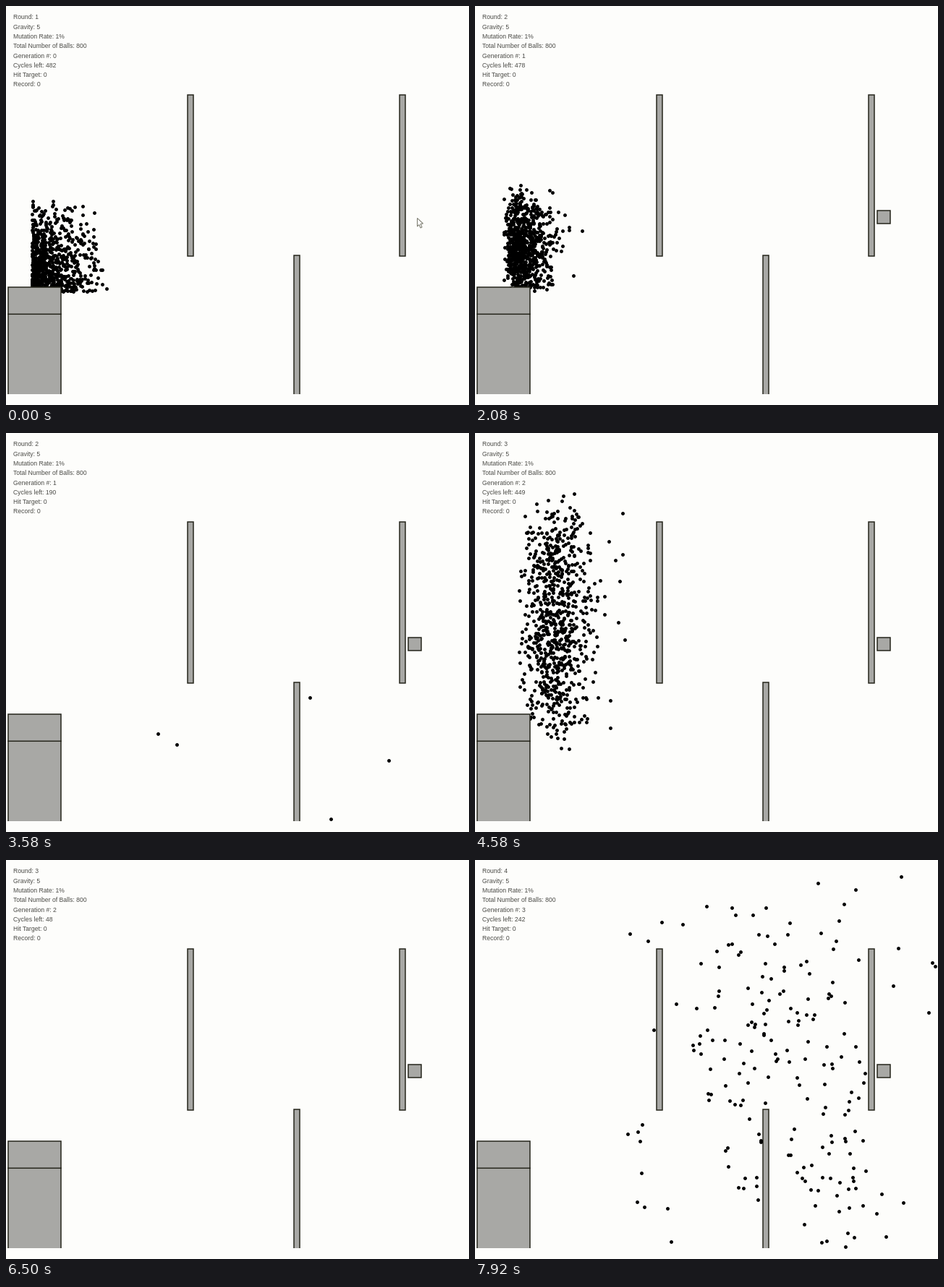
A matplotlib script for the animation above (8000 ms loop, 640 px wide and 552 px high).

```python
import numpy as np
import matplotlib.pyplot as plt
from matplotlib.animation import FuncAnimation
from matplotlib.patches import Polygon, Rectangle

W, H, DPI = 640, 552, 100
PX = 72 / DPI                      # one pixel in points
PAPER, GREY, EDGE, INK = "#fdfdfb", "#a8a8a5", "#24241a", "#4c4c48"
BALLS, CYCLES, GRAVITY = 800, 500, 0.0436
START = 36, 388
FPS, STEP, FRAMES = 12, 40, 200    # simulation is redrawn 12 times a second

# left, top, right, bottom; the floor hides everything below 537
FLOOR = 537
WALLS = [(251, 123, 259, 346), (398, 345, 406, FLOOR + 4), (544, 123, 552, 346)]
BASE = (3, 389, 76, FLOOR + 4)
TARGET = (556, 283, 574, 301)

# the run slows down while many balls fly: (redraw, cycles so far)
PACE = [(0, 18), (25, 522), (34, 629), (55, 1051), (65, 1211), (86, 1600), (95, 1758)]

rng = np.random.default_rng(12)


def launch(gen):
    """Horizontal and upward speeds; each generation is tighter and faster."""
    if gen == 0:
        return 6.4 * rng.beta(0.8, 2.6, BALLS), 7.2 * rng.beta(1, 2, BALLS)
    shape, mean = (gen + 1) ** 2, 1.4 + 0.05 * gen
    return (rng.gamma(shape, mean / shape, BALLS),
            7.1 * rng.beta(2, 3 - gen / 2, BALLS))


def fly(vx, vy):
    """Paths over one round; a ball vanishes once it hits something."""
    t = np.arange(CYCLES + 1)[:, None]
    x = START[0] + vx * t
    y = START[1] - vy * t + GRAVITY * t**2 / 2
    hit = y > FLOOR + 4
    for l, top, r, bottom in WALLS + [TARGET]:
        hit |= (x > l - 2) & (x < r + 2) & (y > top - 2) & (y < bottom + 2)
    hit |= (x < BASE[2]) & (y > BASE[1] + 8)
    dead = np.logical_or.accumulate(hit, axis=0)
    return np.where(dead, np.nan, x), np.where(dead, np.nan, y)


rounds = [fly(*launch(gen)) for gen in range(4)]

fig = plt.figure(figsize=(W / DPI, H / DPI), dpi=DPI, facecolor=PAPER)
ax = fig.add_axes([0, 0, 1, 1])
ax.set_xlim(0, W)
ax.set_ylim(H, 0)
ax.axis("off")
canvas = Rectangle((2, 5), W - 2, FLOOR - 5, transform=ax.transData)


def block(l, top, r, bottom, z=3):
    patch = ax.add_patch(Rectangle((l, top), r - l, bottom - top, fc=GREY, ec=EDGE,
                                   lw=1.5 * PX, snap=False, zorder=z))
    patch.set_clip_path(canvas)
    return patch


for wall in WALLS:
    block(*wall)
block(*BASE, z=5)
ax.plot([3, 76], [426.3, 426.3], color=EDGE, lw=1.5 * PX, snap=False, zorder=6)
target = block(*TARGET)

cursor = ax.add_patch(Polygon(
    [(568.5, 293.5), (568.5, 305), (571, 302.5), (573, 307), (575, 306),
     (573, 301.5), (576.5, 301)], fc="white", ec="#77776a", lw=PX, zorder=8))

lines = [ax.text(10, 18.3 + 13.3 * i, "", family="Liberation Sans",
                 size=8.7 * PX, color=INK, zorder=2) for i in range(8)]

dots, = ax.plot([], [], "o", color="black", ms=4.9 * PX, mew=0, zorder=4)
dots.set_clip_path(canvas)


def draw(n):
    tick = int((n * STEP + 35) * FPS / 1000)
    total = int(round(np.interp(tick, *zip(*PACE))))
    gen, cycle = divmod(total, CYCLES)
    x, y = rounds[gen]
    dots.set_data(x[cycle], y[cycle])
    target.set_visible(tick >= 4)
    cursor.set_visible(tick < 10)
    labels = [f"Round: {gen + 1}", "Gravity: 5", "Mutation Rate: 1%",
              f"Total Number of Balls: {BALLS}", f"Generation #: {gen}",
              f"Cycles left: {CYCLES - cycle}", "Hit Target: 0", "Record: 0"]
    for line, label in zip(lines, labels):
        line.set_text(label)
    return [dots, target, cursor, *lines]


anim = FuncAnimation(fig, draw, frames=FRAMES, interval=STEP, repeat=True,
                     repeat_delay=0, blit=False)
plt.show()
```
